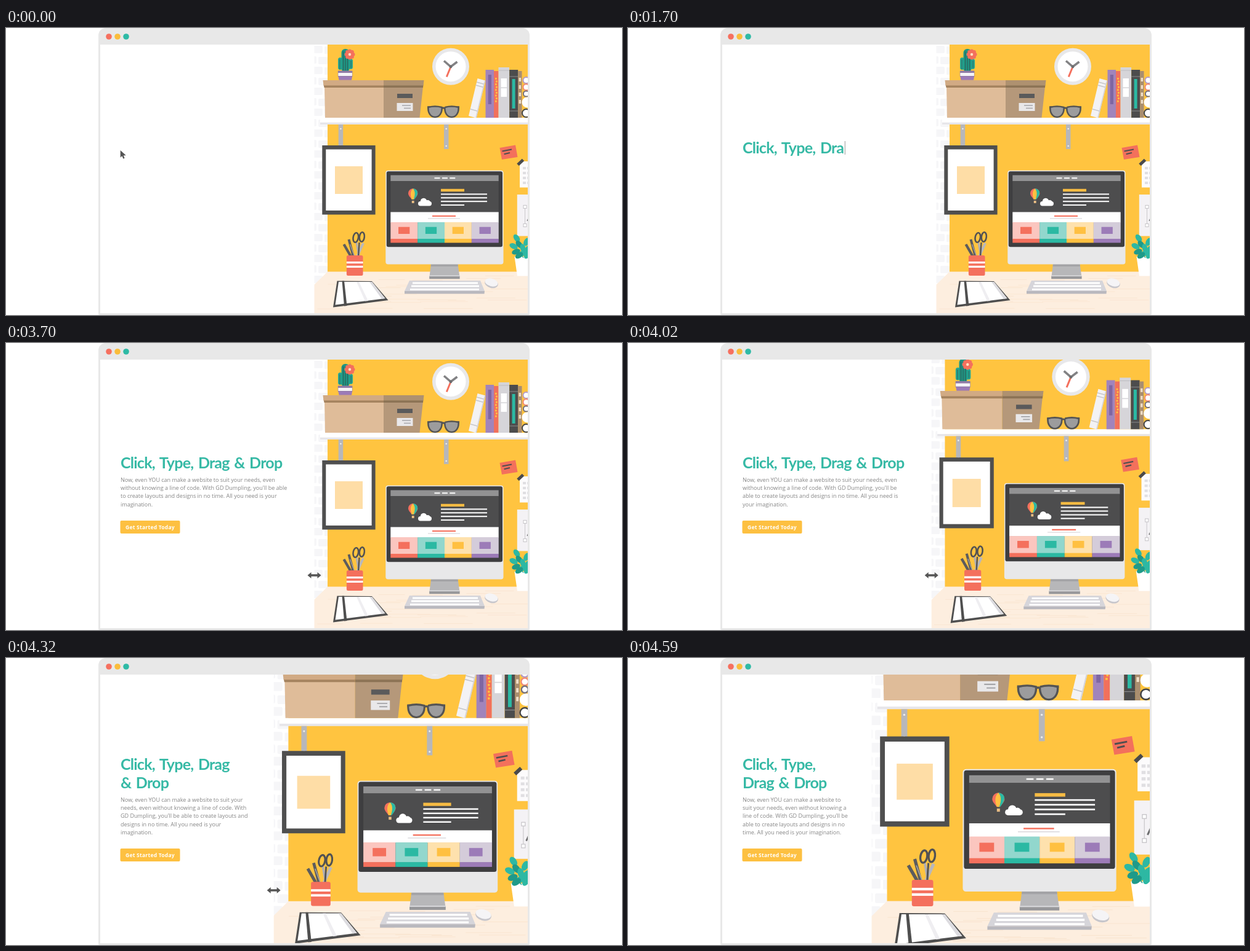
Animation, 1000 px wide and 467 px high, one loop 9.59 s. Source, as an HTML page:

```html
<!DOCTYPE html>
<html lang="en">
<head>
<meta charset="utf-8">
<title>Click, Type, Drag &amp; Drop</title>
<style>
html, body { margin: 0; width: 100%; height: 100%; overflow: hidden; background: #fff; }
svg { display: block; width: 100%; height: 100%; }
text { white-space: pre; }
.head { font: 700 25px Lato, "Open Sans", sans-serif; letter-spacing: -.75px; word-spacing: 2.2px; fill: #36b9a5; }
.body { font: 500 9px "Open Sans", "Noto Sans", sans-serif; fill: #858585; }
.label { font: 700 8.5px "Open Sans", "Noto Sans", sans-serif; letter-spacing: .25px; fill: #fff; }
</style>
</head>
<body>
<svg viewBox="0 0 1000 467" xmlns="http://www.w3.org/2000/svg">
  <defs><clipPath id="pane"><rect id="paneBox" y="27" height="437"/></clipPath></defs>
  <rect x="150" width="700" height="100" rx="12" fill="#e8e8e8"/>
  <rect x="150" y="40" width="700" height="427" rx="2" fill="#e8e8e8"/>
  <rect x="153" y="27" width="694" height="437" fill="#fff"/>
  <circle cx="167" cy="14" r="4.8" fill="#f6705f"/>
  <circle cx="181" cy="14" r="4.8" fill="#fabd3b"/>
  <circle cx="195" cy="14" r="4.8" fill="#2ebaa5"/>
  <g clip-path="url(#pane)"><g id="scene"></g></g>
  <g id="copy"></g>
  <g id="button">
    <rect x="185.5" width="97" height="21" rx="2" fill="#fdc041"/>
    <text class="label" x="194" y="13.5">Get Started Today</text>
  </g>
  <path id="caret" fill="none" stroke-width="1"/>
  <path id="arrow" d="M0 0V11.7L2.7 9.2 4.7 13.8 6.9 12.8 4.9 8.4 9 8.2Z" fill="#555"/>
  <path id="burst" fill="none" stroke="#777" stroke-width="1.2"/>
  <path id="grip" d="M-11 0L-5 -5V-1.7H5V-5L11 0 5 5V1.7H-5V5Z" fill="#555"/>
</svg>
<script>
const $ = id => document.getElementById(id);

// Shape helpers
const rect = (x, y, w, h, fill, r = 0) =>
  `<rect x="${x}" y="${y}" width="${w}" height="${h}" rx="${r}" fill="${fill}"/>`;
const poly = (points, fill) => `<polygon points="${points}" fill="${fill}"/>`;
const line = (points, stroke, w = 2) =>
  `<polyline points="${points}" fill="none" stroke="${stroke}" stroke-width="${w}"/>`;
const path = (d, fill, stroke = 'none', w = 0) =>
  `<path d="${d}" fill="${fill}" stroke="${stroke}" stroke-width="${w}"/>`;
const oval = (x, y, rx, ry, fill, turn = 0, stroke = 'none', w = 0) =>
  `<ellipse cx="${x}" cy="${y}" rx="${rx}" ry="${ry}" fill="${fill}" stroke="${stroke}" stroke-width="${w}" transform="rotate(${turn} ${x} ${y})"/>`;
const repeat = (n, make) => Array.from({ length: n }, (_, i) => make(i)).join('');

const RED = '#f4705d', TEAL = '#2bb9a3', GOLD = '#ffc041', PURPLE = '#9c7bb8', DARK = '#4f4f4f';

let seed = 7;
const rand = () => (seed = seed * 16807 % 2147483647) / 2147483647;

function room() {
  return rect(490, 20, 40, 450, '#fff')
    + repeat(23, i => {
        const y = 29 + i * 17;
        return i % 2
          ? rect(496, y, 8, 12, '#f6f6f8', 2) + rect(507, y + 1, 15, 12, '#f6f6f8', 2)
          : rect(496, y, 18, 12, '#f6f6f8', 2) + rect(517, y + 1, 5, 12, '#f6f6f8', 1);
      })
    + rect(522, 20, 340, 377, '#ffc440')
    + poly('522,396.5 870,396.5 870,480 498,480 498,420', '#fdeedf')
    + repeat(26, () => {
        const x = 505 + rand() * 300, y = 400 + rand() * 62;
        return line(`${x},${y} ${x + 25 + rand() * 60},${y}`, '#f9e3cd', .7);
      });
}

function shelf() {
  const bracket = (x, bottom) => rect(x, 157, 7.5, bottom - 157, '#b7b7ba')
    + oval(x + 3.7, 164, 1.3, 1.3, '#eee') + oval(x + 3.7, bottom - 5, 1.3, 1.3, '#eee');
  return rect(510, 146, 360, 8, '#fff') + rect(510, 153.7, 360, 3.3, '#e7e6ea')
    + bracket(539.7, 197) + bracket(711, 197);
}

function storage() {
  return poly('517,95 613,95 613,146 518,146', '#dfbc99')
    + poly('613,95 677,95 671.5,146 613,146', '#b5987a')
    + poly('515.5,92 613,92 613,97 516.5,97', '#a5835f') + poly('613,92 677.5,92 677,97 613,97', '#8c7355')
    + poly('514.5,85 613,85 613,93.5 515.5,93.5', '#d1aa84') + poly('613,85 678.5,85 677.5,93.5 613,93.5', '#ae9170')
    + rect(635, 107, 25, 7, '#5a5a5b') + rect(634.5, 122, 26, 13, '#e9e8ea')
    + line('643,126 657,126', '#a5a5a8', 1.6) + line('646,130.5 657,130.5', '#a5a5a8', 1.6);
}

function cactus() {
  return rect(539, 48, 7, 20, '#25a793', 3.5) + rect(556, 50, 7, 17, '#25a793', 3.5)
    + rect(544.5, 34, 13, 38, '#1f9684', 6)
    + repeat(3, i => line(`${547.5 + i * 3.5},38 ${547.5 + i * 3.5},69`, '#2d5f58', 1.1))
    + line('542,51 542,67', '#2d5f58', 1) + line('560,53 560,65', '#2d5f58', 1)
    + repeat(8, i => oval(558 + 5.5 * Math.cos(i * Math.PI / 4), 43 + 5.5 * Math.sin(i * Math.PI / 4), 3, 3, RED))
    + oval(558, 43, 4.5, 4.5, RED) + oval(558, 43, 2.2, 2.2, '#fde3c2')
    + rect(538.8, 69.5, 23.6, 10, '#8f7aa5', 1)
    + poly('539.5,79 562,79 561,84.8 540.5,84.8', PURPLE) + rect(539.3, 73, 22.6, 5, '#f6f4f8');
}

function clock() {
  return oval(722, 62.7, 30, 30, '#e8e8ea') + oval(722, 62.7, 24.5, 24.5, '#fff')
    + line('722,63 715.3,79.5', RED, 3) + line('711,53.5 722,63 732.5,55', '#828284', 3.6)
    + oval(722, 63, 2.4, 2.4, '#6d6d6f');
}

function glasses() {
  const lens = x => path(`M${x} 129q11 -3 22 0c1 9 -4 16 -11 16s-12 -7 -11 -16`, '#9c9c9d', '#545454', 2.6);
  return line('684,129 690,129', '#545454', 3.4) + line('730,129 736,129', '#545454', 3.4)
    + path('M706 132q4 -4 8 0', 'none', '#545454', 2.6) + lens(685.5) + lens(712.5);
}

function books() {
  const roll = (y, r, stroke) => oval(844.5, y, r, r, '#fff', 0, stroke, 2);
  return poly('765.5,82 778,85.5 763.5,146.5 751,143', '#f3f2f4')
    + line('764,88 776.5,91.5', '#c6c6c9', 1.4) + line('762.5,93 775.3,96.5', '#c6c6c9', 1.4)
    + line('754,132 766.5,135.5', '#c6c6c9', 1.4) + line('777.4,86 763,146', '#d4d3d7', 1.6)
    + rect(778.5, 68, 13.5, 78, '#a184bb') + rect(782.7, 76, 5.3, 48, '#7f66a2')
    + rect(792, 70, 7.5, 76, '#f1705c') + repeat(9, i => rect(794 + i % 2, 81 + i * 4.6, 2.8, 2.8, GOLD))
    + rect(799.5, 64, 17.5, 82, '#d6d5d9') + rect(803.5, 82, 9.5, 14.5, '#fff') + rect(803.5, 98, 9.5, 14, '#fff')
    + line('799.5,69 817,69', '#bcbcc0', 1)
    + rect(817.2, 68, 14, 78, '#4c4c4d') + rect(821.6, 83, 5, 48, TEAL)
    + line('817.2,79 831.2,79', '#8a8a8b', 1) + line('817.2,135 831.2,135', '#8a8a8b', 1)
    + rect(831.2, 70, 6.3, 76, '#a98e70') + repeat(4, i => rect(832.7, 81 + i * 12, 3.3, 6, '#f0dfc8'))
    + roll(85, 5, '#b49bc6') + roll(96.3, 5, '#f28a74') + roll(107, 4.6, '#77727c')
    + oval(846, 121, 8.5, 8.5, '#fff') + roll(138.5, 6.5, '#454545');
}

function notes() {
  return poly('801.5,195 827,190.5 830.5,210 805,214', '#f3705c')
    + line('805.5,200.5 821,197.5', DARK, 2.2) + line('808.6,205.2 818,203', DARK, 2.2)
    + rect(834, 217, 36, 42.5, '#fcfbfc')
    + repeat(4, i => rect(839, 226 + i * 8, 5, 4, '#e0dfe2') + rect(846, 226 + i * 8, 5, 4, '#e0dfe2'))
    + line('831,222.5 839.5,214.5', '#4a4a4a', 5)
    + rect(829.8, 271, 40, 67.5, '#f4f2f5') + line('842.5,291 842.5,321', '#cac8cc', 1)
    + repeat(2, i => `<rect x="840" y="${288.5 + i * 30}" width="5" height="5" fill="#fff" stroke="#c6c4c8"/>`)
    + line('846.5,314 852,302', '#6b6b6d', 2.2);
}

function plant() {
  const leaves = [[829, 342, -35], [824, 355, -65], [833, 352, -40], [845, 348, 25], [839, 358, -15],
    [828, 364, 70], [838, 367, 60], [847, 360, 40], [833, 370, 55], [846, 369, 30]];
  return poly('825.5,372 870,372 870,403.5 830,403.5', '#fff')
    + line('828,358 840,374', '#1f9a89', 1.2)
    + leaves.map(([x, y, turn], i) => oval(x, y, 4.3, 7, i % 3 == 2 ? '#1f9a89' : '#2db8a3', turn)).join('');
}

function picture() {
  return rect(513.3, 191, 86.3, 112.6, DARK) + rect(519.3, 197.5, 74.3, 99.5, '#fff')
    + rect(534, 225, 45, 45, '#fedda6');
}

function screen() {
  const tones = [[RED, '#fbc6bf'], [TEAL, '#92d7cd'], [GOLD, '#fee1ad'], [PURPLE, '#d4ccda']];
  return rect(624.3, 239.5, 175.4, 9.7, '#929293')
    + repeat(3, i => line(`${695.5 + i * 12.4},244.3 ${704.5 + i * 12.4},244.3`, '#fff', 2))
    + rect(624.3, 249, 175.4, 51, '#4d4d4e')
    + rect(624.3, 299.5, 175.4, 17, '#fff')
    + line('692,306 730,306', RED, 2) + line('685,310 737,310', '#e0dfe2', 1.6)
    + tones.map(([solid, tint], i) => {
        const x = 624.3 + i * 43.85;
        return rect(x, 316, 43.9, 27.5, tint) + rect(x, 343, 43.9, 6.5, solid) + rect(x + 12.7, 323.7, 18.3, 11.3, solid);
      }).join('')
    + rect(706, 261.8, 38, 4.4, '#f6bb43')
    + [75, 75, 75, 38].map((w, i) => rect(706, 269.4 + i * 5.9, w, 2, '#fff')).join('')
    + path('M653 269a7.7 7.7 0 0 1 15.4 0c0 4-4 7-5.5 10h-4.4c-1.5-3-5.5-6-5.5-10', RED)
    + path('M660.7 261.3c-5 4-4.5 12-1.7 17.7h3.4c2.8-5.7 3.3-13.7-1.7-17.7', GOLD)
    + path('M660.7 261.3c9 1 10 9 2 17.7h-1c2-5 3.5-13-1-17.7', TEAL)
    + rect(658.8, 281, 3.8, 4, '#e9bd84')
    + rect(669, 282, 22, 7.5, '#fff', 3.7) + oval(678, 282, 5.2, 5.2, '#fff') + oval(684.5, 284, 4, 4, '#fff');
}

function computer() {
  return poly('690,384 733.5,384 736.3,404 687.5,404', '#b7b7b9') + poly('690,384 733.5,384 734,388 689.5,388', '#a3a3a6')
    + rect(687.2, 403.5, 49.4, 4.8, '#97979a') + rect(687.2, 402.5, 49.4, 1.6, '#d9d9dc')
    + rect(616.3, 231.8, 191.2, 152.8, '#e8e8e9', 4)
    + rect(617.8, 233.3, 188.2, 123, '#3e3e40', 3)
    + screen()
    + poly('655,411 770,411 777,428 647,428', '#d6d5da') + poly('647,428 777,428 776.5,432.5 647,432.5', '#b9b8be')
    + line('660,415 766,415', '#fff', 2.8) + line('658,420 768,420', '#fff', 2.8) + line('656,425.3 768,425.3', '#fff', 2.8)
    + oval(788, 415.7, 11, 7.2, '#c7c6cb', 15) + oval(788, 414, 10.7, 6.3, '#f5f4f6', 15);
}

function desk() {
  return line('548.5,352 560,372', '#5c5c5d', 4.2) + line('556.5,344 564,372', '#5c5c5d', 4)
    + line('558.5,352 566,372', '#a5a5a8', 1.3)
    + line('580,350 570,372', '#b9b8bc', 4) + line('569,349 573,372', '#b0afb4', 3)
    + line('573.5,349 572,372', '#555', 2.4)
    + oval(567.8, 341, 4.2, 7.8, 'none', 10, '#525253', 2.6) + oval(577.8, 340, 4, 7.8, 'none', 6, '#525253', 2.6)
    + rect(552.9, 370, 26.6, 33, RED, 2.5) + rect(552.9, 380, 26.6, 3.2, '#fff') + rect(552.9, 386.8, 26.6, 3.2, '#fff')
    + poly('537.5,411.5 594,412 620.5,443 531,454.5', DARK)
    + poly('540,413 594,413 615.5,440 534.5,450.5', '#fff')
    + poly('569,413 573,413 588,444 583,444.5', '#efeef1') + poly('590,413 594,413 615.5,440 610,440.7', '#dddce0')
    + poly('545.5,411.5 549,411.5 553.5,452 549,452.5', DARK);
}

$('scene').innerHTML = room() + clock() + shelf() + cactus() + storage() + glasses() + books()
  + notes() + picture() + computer() + plant() + desk();

$('burst').setAttribute('d', repeat(8, i => {
  const a = i * Math.PI / 4, c = Math.cos(a), s = Math.sin(a);
  return i == 1 ? '' : `M${4.5 * c} ${4.5 * s}L${8.7 * c} ${8.7 * s}`;
}));

// Copy
const TITLE = 'Click, Type, Drag & Drop';
const PROSE = "Now, even YOU can make a website to suit your needs, even without knowing a line of code. "
  + "With GD Dumpling, you'll be able to create layouts and designs in no time. All you need is your imagination.";
const LEFT = 186, LEAD = 13.4;

const addLines = (n, cls) => Array.from({ length: n }, () => {
  const el = document.createElementNS('http://www.w3.org/2000/svg', 'text');
  el.setAttribute('class', cls);
  el.setAttribute('x', LEFT);
  return $('copy').appendChild(el);
});
const titleLines = addLines(2, 'head'), proseLines = addLines(7, 'body');

const ctx = document.createElement('canvas').getContext('2d');
ctx.font = '500 9px "Open Sans", "Noto Sans", sans-serif';
const measure = s => ctx.measureText(s).width;
const unit = 252 / measure(PROSE.slice(0, 57));

function wrapTitle(width) {
  if (width >= 261) return [TITLE];
  const cut = width >= 181 ? 17 : 12;
  return [TITLE.slice(0, cut), TITLE.slice(cut + 1)];
}

function wrapProse(width) {
  const lines = [''];
  for (const word of PROSE.split(' ')) {
    const last = lines[lines.length - 1], next = last ? last + ' ' + word : word;
    if (measure(next) * unit <= width) lines[lines.length - 1] = next;
    else lines.push(word);
  }
  return lines;
}

// Keeps the first n characters; each line break stands for one space
function take(lines, n) {
  return lines.map(s => {
    const part = s.slice(0, Math.max(0, n));
    n -= s.length + 1;
    return part;
  });
}

// Length of the title holding n visible letters
function titleLength(n) {
  let i = 0;
  while (n > 0 && i < TITLE.length) if (TITLE[i++] != ' ') n--;
  return i;
}

function setLines(els, lines, y, lead) {
  els.forEach((el, i) => {
    el.textContent = lines[i] || '';
    el.setAttribute('y', y + i * lead);
  });
}

const show = (id, on) => $(id).setAttribute('display', on ? 'inline' : 'none');
const move = (id, x, y) => $(id).setAttribute('transform', `translate(${x} ${y})`);
const PROSE_STEPS = [0, 14, 33, 57, 82, 111, 140, 169, 999];

function draw(t) {
  const u = Math.min(23, Math.max(0, Math.floor((t - 3900) / 30))) / 24;
  const edge = 500.5 - 105.5 * u * u * (3 - 2 * u);
  const zoom = (846.5 - edge) / 346;
  $('scene').setAttribute('transform', `translate(856.5 400) scale(${zoom}) translate(-856.5 -400)`);
  $('paneBox').setAttribute('x', edge);
  $('paneBox').setAttribute('width', 847 - edge);

  const width = edge - 222.5;
  const title = wrapTitle(width), prose = wrapProse(width);
  const extra = 30 * (title.length - 1), grow = LEAD * (prose.length - 4);
  const top = Math.floor(-(extra + grow) / 2);
  const letters = t < 600 ? 0 : 3 + Math.floor((t - 600) / 100);
  const step = Math.floor((t - 2400) / 100);
  const typed = step < 0 ? 0 : PROSE_STEPS[Math.min(step, 8)];
  const shown = take(prose, typed);
  setLines(titleLines, take(title, titleLength(letters)), 204 + top, 30);
  setLines(proseLines, shown, 225.5 + top + extra, LEAD);
  show('button', t >= 3700);
  move('button', 0, Math.round(289 + top + extra + grow));

  const caret = (x, y0, y1, color) => {
    $('caret').setAttribute('d', `M${x} ${y0}V${y1}`);
    $('caret').setAttribute('stroke', color);
  };
  show('caret', t >= 400 && t < 3300 || t >= 3500 && t < 3700);
  if (t < 2400) {
    caret(LEFT + .5 + (letters ? titleLines[0].getComputedTextLength() + 1.5 : 0), 184, 206, '#999');
  } else if (t < 3300) {
    const row = Math.max(0, shown.filter(Boolean).length - 1);
    const y = 225.5 + row * LEAD;
    caret(LEFT + .5 + proseLines[row].getComputedTextLength() + 1, y - 8.5, y + 2.5, '#666');
  } else {
    caret(LEFT + .5, 281, 311, '#999');
  }

  const late = t >= 3300;
  show('arrow', t < 400 || late && t < 3500);
  show('burst', t >= 200 && t < 400 || t >= 3400 && t < 3500);
  move('arrow', 185.7, late ? 291 : 199);
  move('burst', 186, late ? 290 : 197.7);
  show('grip', t >= 3700 && t < 4590);
  move('grip', edge, 378);
}

const start = performance.now();
function tick() {
  draw((performance.now() - start) % 9590);
  requestAnimationFrame(tick);
}
tick();
</script>
</body>
</html>
```
